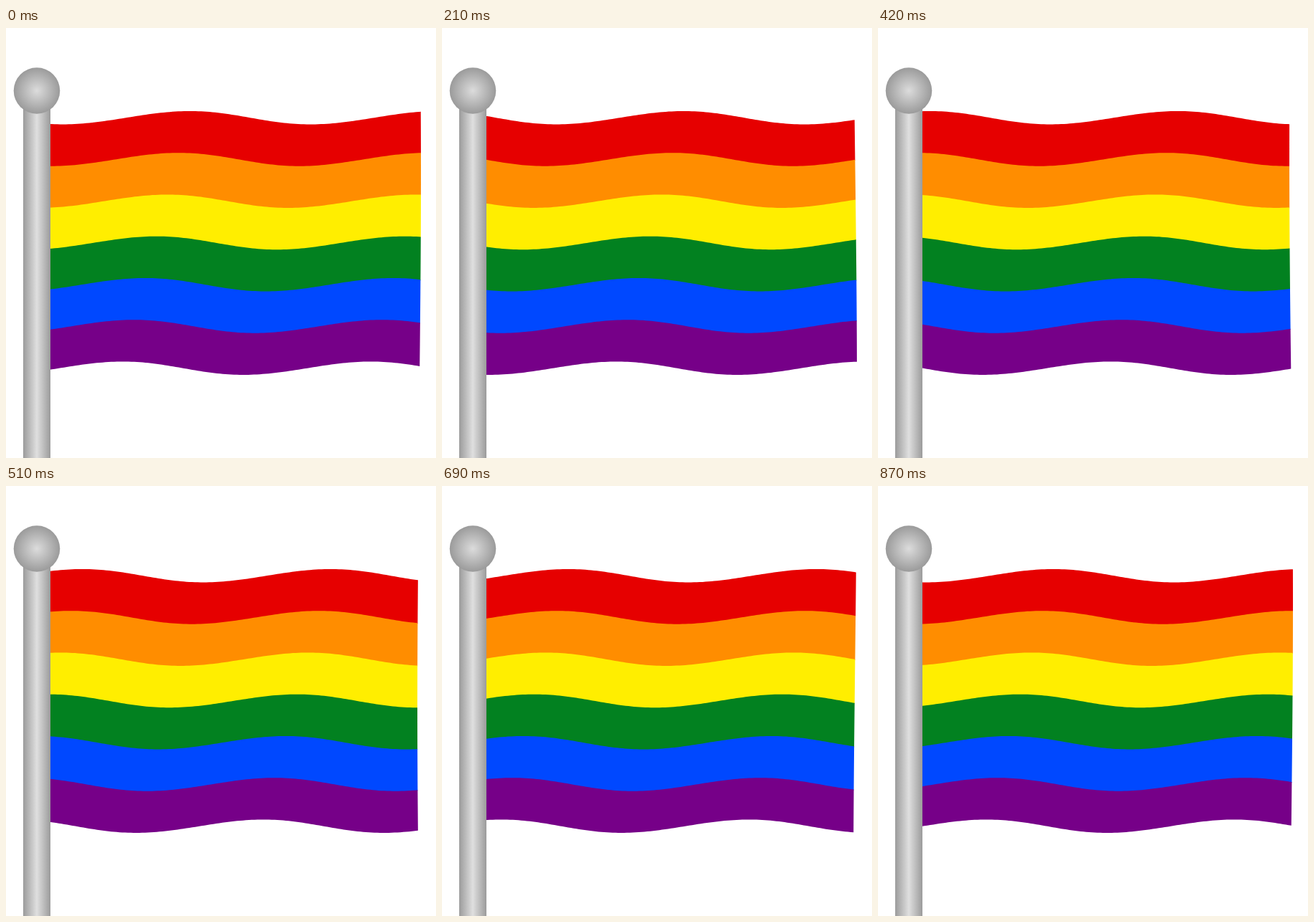
Animation of 600x600 px, one loop 900 ms. Source, as an HTML page with a canvas:

```html
<!DOCTYPE html>
<html lang="en">
<head>
<meta charset="utf-8">
<title>Waving flag</title>
<style>
  html, body { margin: 0; width: 100%; height: 100%; overflow: hidden; background: #fff; }
  canvas { display: block; }
</style>
</head>
<body>
<canvas id="stage" width="600" height="600"></canvas>
<script>
const ctx = document.getElementById('stage').getContext('2d');
const COLORS = ['#e60000', '#ff8d00', '#ffee00', '#028120', '#0048ff', '#760088'];
const LEFT = 50, RIGHT = 576.5, TOP = 125.2, STRIPE = 58.25;
const LOOP = 900, STEP = 30;
const WAVELENGTH = 346, AMPLITUDE = 9.25, SLANT = Math.tan(Math.PI / 12);
const CREST = 256.7 + SLANT * 116;

// A transverse wave travelling along a line tilted by 15 degrees.
function wavePoint(x, y, progress) {
  const along = (x + SLANT * y - CREST) / WAVELENGTH - progress;
  const lift = AMPLITUDE * Math.cos(2 * Math.PI * along);
  return [x + SLANT * lift, y - lift];
}

function drawStripe(top, bottom, color, progress) {
  ctx.beginPath();
  for (let x = LEFT; x < RIGHT; x += 4) ctx.lineTo(...wavePoint(x, top, progress));
  for (let y = top; y < bottom; y += 4) ctx.lineTo(...wavePoint(RIGHT, y, progress));
  for (let x = RIGHT; x > LEFT; x -= 4) ctx.lineTo(...wavePoint(x, bottom, progress));
  ctx.lineTo(...wavePoint(LEFT, bottom, progress));
  ctx.fillStyle = color;
  ctx.fill();
}

function shade(gradient, ...colors) {
  colors.forEach((color, i) => gradient.addColorStop(i / (colors.length - 1), color));
  return gradient;
}

const poleFill = shade(ctx.createLinearGradient(24, 0, 62, 0), '#9b9b9b', '#dfdfdf', '#9b9b9b');
const ballFill = shade(ctx.createRadialGradient(43, 87.5, 0, 43, 87.5, 32.5), '#dcdcdc', '#9a9a9a');

function drawPole() {
  ctx.fillStyle = poleFill;
  ctx.fillRect(24, 100, 38, 500);
  ctx.beginPath();
  ctx.arc(43, 87.5, 32.3, 0, 2 * Math.PI);
  ctx.fillStyle = ballFill;
  ctx.fill();
}

function draw() {
  const time = performance.now() % LOOP;
  const progress = Math.floor(time / STEP) * STEP / LOOP;
  ctx.clearRect(0, 0, 600, 600);
  COLORS.forEach((color, i) => {
    const top = TOP + i * STRIPE;
    const overlap = i < COLORS.length - 1 ? 1 : 0; // hides seams
    drawStripe(top, top + STRIPE + overlap, color, progress);
  });
  drawPole();
  requestAnimationFrame(draw);
}
draw();
</script>
</body>
</html>
```
